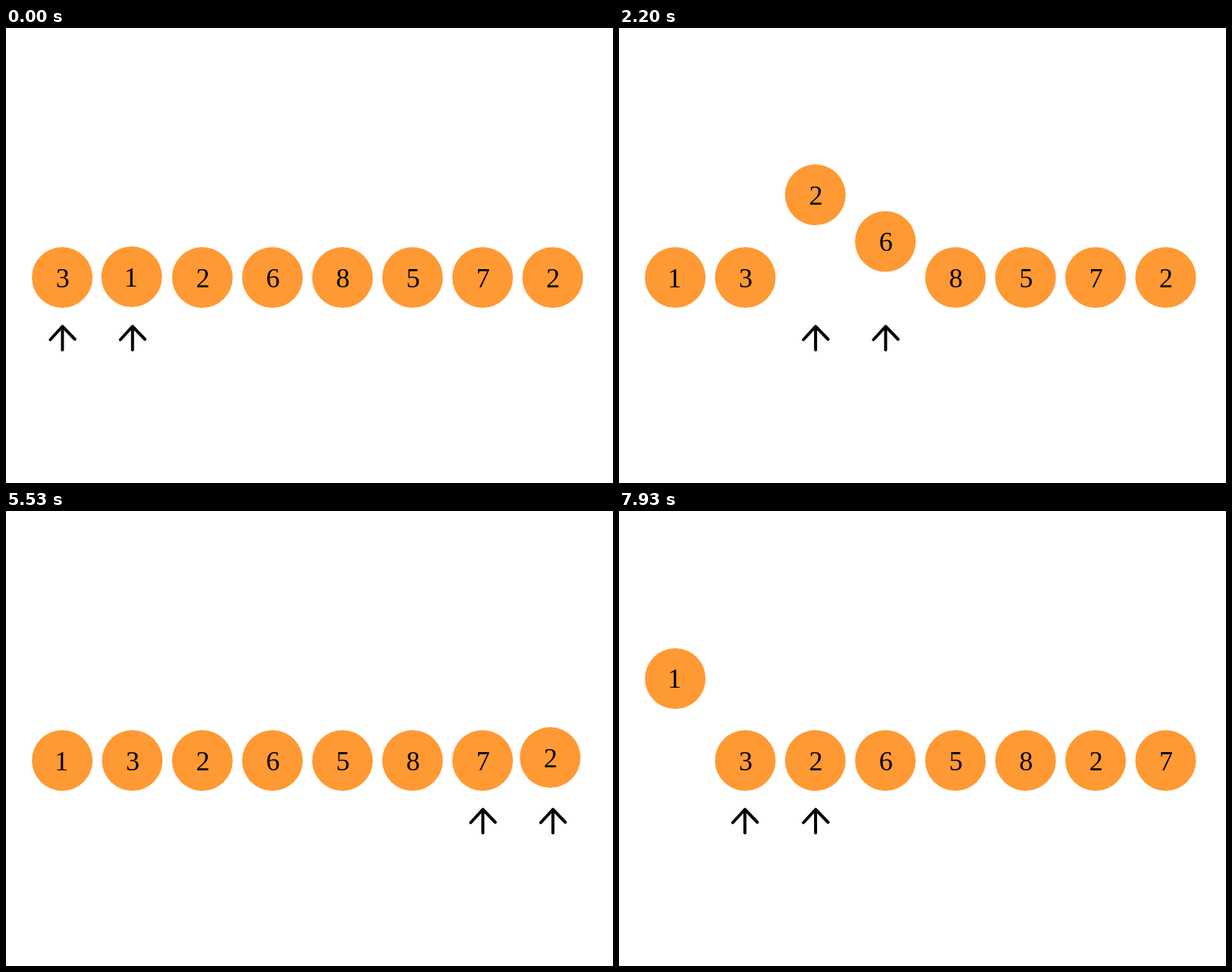
Animation, 800 px wide and 600 px high, one loop 8 s. Source, as an HTML page:

```html
<!DOCTYPE html>
<html lang="en">
<head>
<meta charset="utf-8">
<title>Merge sort</title>
<style>
  html, body { margin: 0; width: 100%; height: 100%; overflow: hidden; background: #fff; }
  svg { display: block; width: 800px; height: 600px; }
  circle { fill: #ff9933; }
  text { font: 36px "Liberation Serif", "Times New Roman", serif; text-anchor: middle; fill: #000; }
  path { fill: none; stroke: #000; stroke-width: 4; stroke-linecap: round; stroke-linejoin: round; }
</style>
</head>
<body>
<svg id="stage" viewBox="0 0 800 600"></svg>
<script>
const LOOP = 8000, STEP = 500, LEAD = 100 / 3, TICK = 200 / 3;
const LEFT = 74.1, GAP = 92.34, ROW_Y = 329, LIFT = 109;
const stage = document.getElementById('stage');

function add(parent, tag, attrs, content = '') {
  const el = document.createElementNS('http://www.w3.org/2000/svg', tag);
  for (const key in attrs) el.setAttribute(key, attrs[key]);
  el.textContent = content;
  return parent.appendChild(el);
}

const part = (slot) => ({ el: add(stage, 'g', {}), start: [slot, 0], moves: [] });

const arrows = [0, 1].map(slot => {
  const arrow = part(slot);
  add(arrow.el, 'path', { d: 'M.3 95.5V64.5M-15.7 82L.3 64.5L16.7 81.5' });
  return arrow;
});

const balls = [3, 1, 2, 6, 8, 5, 7, 2].map((value, slot) => {
  const ball = part(slot);
  add(ball.el, 'circle', { r: 40 });
  add(ball.el, 'text', { x: value === 1 ? -0.8 : 0.6, y: 12.5 }, value);
  return ball;
});

// Each move runs for one step; height is 0 in the row and 1 when lifted.
const move = (item, step, slot, height = 0) => item.moves.push({ step, slot, height });
const point = (step, a, b) => [a, b].forEach((slot, i) => move(arrows[i], step, slot));

function mergePair(step, slot, first, second) {
  move(balls[first], step, slot, 1);
  move(balls[second], step + 1, slot + 1, 1);
  move(balls[first], step + 2, slot);
  move(balls[second], step + 2, slot + 1);
}

mergePair(0, 0, 1, 0);
point(3, 2, 3);
mergePair(3, 2, 2, 3);
point(6, 4, 5);
mergePair(7, 4, 5, 4);
point(10, 6, 7);
mergePair(11, 6, 7, 6);
point(14, 0, 2);
move(balls[1], 15, 0, 1);
move(arrows[0], 15, 1);

const ease = p => p < 0.5 ? 2 * p * p : 1 - 2 * (1 - p) ** 2;

function place(item, time) {
  let [slot, height] = item.start;
  for (const m of item.moves) {
    const p = ease(Math.min(1, Math.max(0, time / STEP - m.step)));
    slot += (m.slot - slot) * p;
    height += (m.height - height) * p;
  }
  item.el.setAttribute('transform', `translate(${LEFT + GAP * slot} ${ROW_Y - LIFT * height})`);
}

function draw(now) {
  // The motion advances 15 times a second.
  const time = Math.floor((now % LOOP + 4) / TICK) * TICK % LOOP + LEAD;
  [...arrows, ...balls].forEach(item => place(item, time));
}

const origin = performance.now();
function frame() {
  draw(performance.now() - origin);
  requestAnimationFrame(frame);
}
frame();
</script>
</body>
</html>
```
